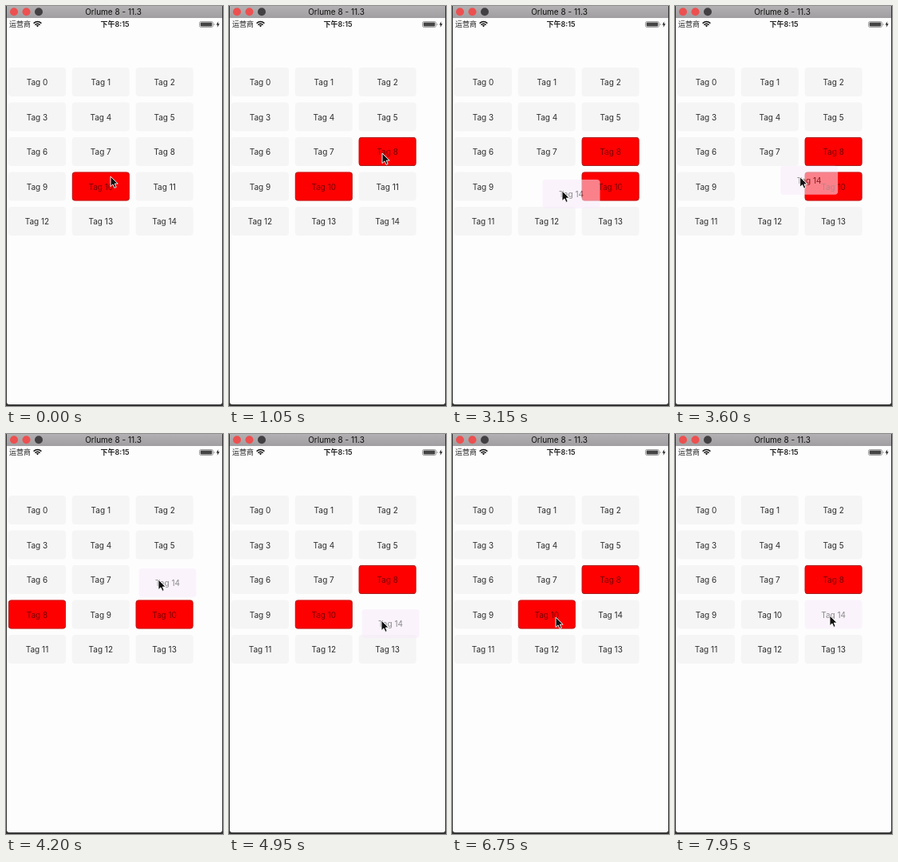
Recreate the animation shown at these times as an HTML page. Size 272 by 500 pixels, loop 8 s.

```html
<!DOCTYPE html>
<html lang="zh">
<head>
<meta charset="utf-8">
<style>
  html, body { margin: 0; width: 100%; height: 100%; overflow: hidden; background: #333; }
  #window { position: absolute; left: 1px; top: 0; width: 270px; height: 498px; background: #fdfdfd; border-radius: 0 0 3px 3px; }
  #title { height: 15px; background: linear-gradient(#b2b0b2, #a09ea0); font: 10px/15px Inter, sans-serif; color: #111; text-align: center; text-indent: -3px; }
  svg { position: absolute; left: 0; top: 0; }
  .tag { position: absolute; left: 0; top: 0; width: 72px; height: 36px; border-radius: 4px; background: #f5f5f5;
    color: #2c2c2c; font: 10px/36px Inter, sans-serif; text-align: center; }
  .on { background: #fe0000; color: #7a0000; box-shadow: inset 0 0 0 .7px #8c2c2c; }
  .lifted { background: #f8ebfc; opacity: .55; }
</style>
</head>
<body>
<div id="window"><div id="title">Orlume 8 - 11.3</div></div>
<svg width="272" height="40">
  <g fill="#ed5050"><circle cx="10" cy="7.3" r="5"/><circle cx="25.5" cy="7.3" r="5"/><circle cx="41" cy="7.3" r="5" fill="#424042"/></g>
  <g font-family="Inter, 'Noto Sans CJK SC', 'Noto Sans CJK', sans-serif" font-size="9" fill="#222">
    <text x="4" y="26">运营商</text>
    <text x="136.5" y="26" text-anchor="middle" font-weight="600">下午8:15</text>
  </g>
  <g fill="none" stroke="#111" stroke-width="1.5">
    <path d="M34.6 21.6Q39.5 17.6 44.4 21.6M36.4 23.6Q39.5 21 42.6 23.6"/>
    <path d="M37.8 24.4L39.5 26.2L41.2 24.4Q39.5 23.2 37.8 24.4Z" fill="#111" stroke="none"/>
  </g>
  <rect x="242.5" y="19.5" width="17" height="7" rx="1.8" fill="none" stroke="#888" stroke-width=".8"/>
  <rect x="243.7" y="20.6" width="14.6" height="4.8" rx=".8" fill="#444"/>
  <path d="M260.7 21.7v2.6q1-.3 1-1.3t-1-1.3z" fill="#888"/>
  <path d="M266.3 19.3L263.5 23.6H265.3L264.7 26.7L267.7 22.3H265.8Z" fill="#222"/>
</svg>
<div id="tags"></div>
<svg id="cursor" width="13" height="19" viewBox="-1 -1 13 19">
  <path d="M0 0V12.6L3 9.9L5 14.4L7.2 13.4L5.3 9.1H9.2Z" fill="#111" stroke="#fff" stroke-width=".9"/>
</svg>
<script>
const LOOP = 8000, STEP = 150, DRAGGED = 14;
const LIFT = 2100, DRAG = 2550, DROP = 5250, LIFT_AGAIN = 7950;
const GRAB = [24.5, 14];

// Pointer stops: time, x, y
const pointer = [
  [0, 131, 213], [150, 131, 213], [750, 192, 184], [1050, 192, 184],
  [1650, 194, 271], [DRAG, 194, 271], [3000, 138, 231], [3300, 138, 231],
  [4050, 191, 182], [4350, 191, 182], [4950, 191, 233], [5100, 198, 222],
  [5850, 198, 222], [6600, 130, 229], [6900, 130, 229], [7350, 194, 227], [LOOP, 194, 227]
];
// Slot held open for the dragged tag: time, slot
const gaps = [[0, 14], [2800, 10], [3700, 8], [4600, 11]];

const holder = document.getElementById('tags');
const cursor = document.getElementById('cursor');
const tags = Array.from({ length: 15 }, (_, i) => {
  const tag = holder.appendChild(document.createElement('div'));
  tag.className = 'tag';
  tag.textContent = 'Tag ' + i;
  return tag;
});

const clamp = v => Math.max(0, Math.min(1, v));
const ease = v => v * v * (3 - 2 * v);
const mix = (a, b, k) => a.map((v, i) => v + (b[i] - v) * k);
const slot = i => [3 + i % 3 * 79.8, 77 + Math.floor(i / 3) * 43.5];
const place = (el, [x, y]) => el.style.transform = `translate(${x}px, ${y}px)`;

function pointerAt(t) {
  const i = pointer.findIndex(p => p[0] > t);
  const [t0, ...from] = pointer[i - 1], [t1, ...to] = pointer[i];
  return mix(from, to, ease((t - t0) / (t1 - t0)));
}

function draw(t) {
  const tip = pointerAt(t);
  const current = gaps.findLastIndex(g => g[0] <= t);
  const [since, gap] = gaps[current];
  const previous = gaps[Math.max(0, current - 1)][1];
  const settle = ease(clamp((t - since) / 300));
  const slotFor = (i, open) => slot(i < open ? i : i + 1);
  const dragging = t > DRAG && t < DROP;

  tags.forEach((tag, i) => {
    if (i === DRAGGED) place(tag, dragging ? tip.map((v, k) => v - GRAB[k]) : slot(gap));
    else place(tag, mix(slotFor(i, previous), slotFor(i, gap), settle));
  });
  tags[8].classList.toggle('on', t >= 1050);
  tags[10].classList.toggle('on', t < 6900);
  tags[DRAGGED].classList.toggle('lifted', t >= LIFT && t < DROP || t >= LIFT_AGAIN);
  place(cursor, tip.map(v => v - 1));
}

function frame() {
  const t = performance.now() % LOOP;
  draw(Math.floor(t / STEP) * STEP);
  requestAnimationFrame(frame);
}
frame();
</script>
</body>
</html>
```
